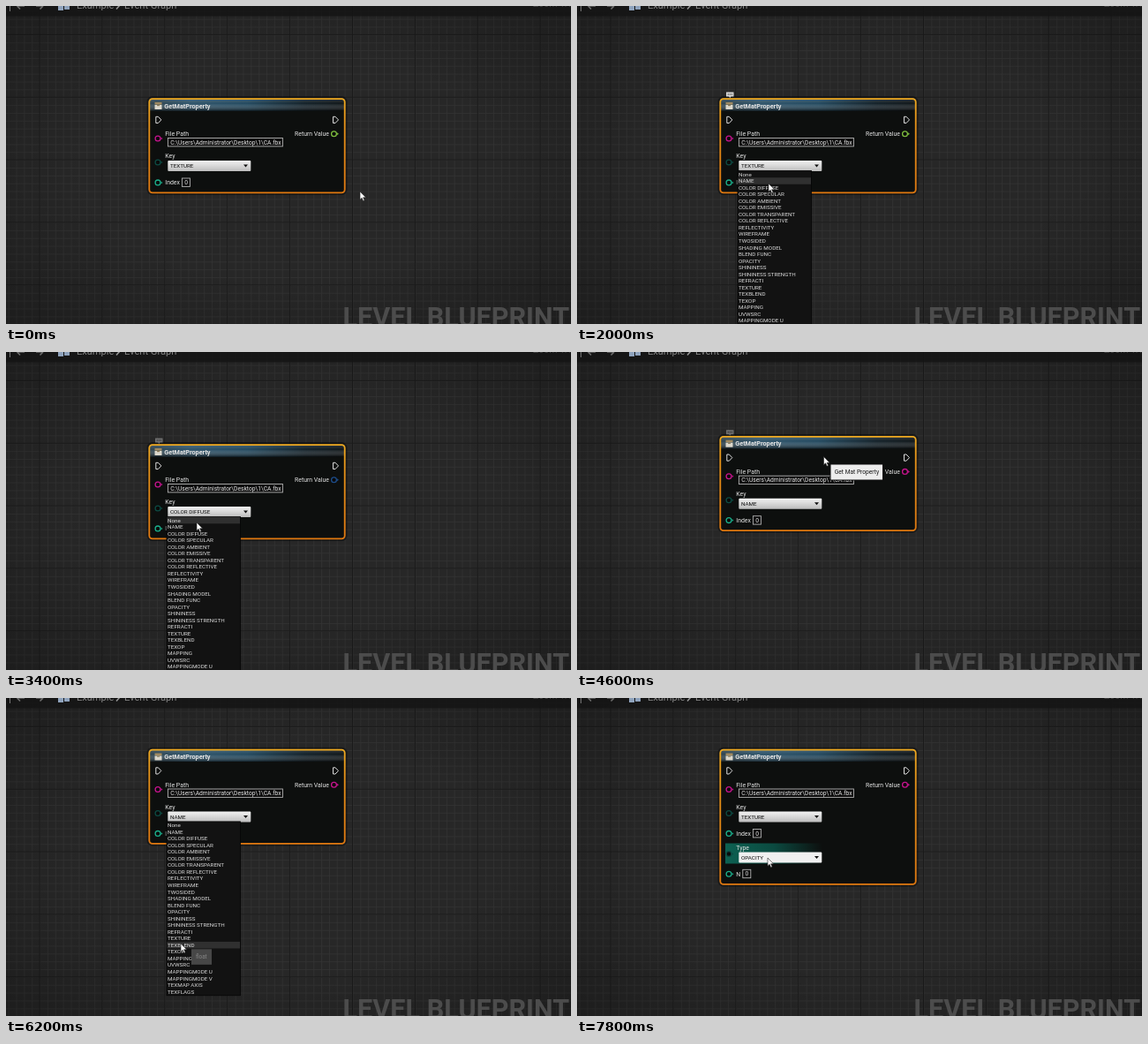
Write an HTML page that moves like this. It is 640 px wide and 360 px high and loops after 8000 ms.

```html
<!DOCTYPE html>
<html lang="en">
<head>
<meta charset="utf-8">
<title>Node graph</title>
<style>
html, body { margin: 0; width: 100%; height: 100%; overflow: hidden; background: #242424; }
svg { display: block; width: 100%; height: 100%; }
text { font-family: Roboto, "Liberation Sans", sans-serif; white-space: pre; }
</style>
</head>
<body>
<svg viewBox="0 0 640 360">
  <defs>
    <pattern id="minor" x="109" y="245" width="8.86" height="8.86" patternUnits="userSpaceOnUse">
      <path d="M0 .4H8.86M.4 0V8.86" stroke="#323232" stroke-width=".8"/>
    </pattern>
    <pattern id="major" x="108.5" y="244.5" width="70.88" height="70.88" patternUnits="userSpaceOnUse">
      <path d="M0 .5H70.88M.5 0V70.88" stroke="#1a1a1a"/>
    </pattern>
    <radialGradient id="shade" cx=".5" cy=".5" r=".72">
      <stop offset=".5" stop-color="#000" stop-opacity="0"/>
      <stop offset="1" stop-color="#000" stop-opacity=".27"/>
    </radialGradient>
    <linearGradient id="frame" x2="0" y2="1">
      <stop stop-color="#efa91f"/><stop offset=".3" stop-color="#e48f16"/><stop offset="1" stop-color="#e0780f"/>
    </linearGradient>
    <linearGradient id="head">
      <stop stop-color="#2f434e"/><stop offset=".2" stop-color="#31566c"/>
      <stop offset=".5" stop-color="#244a60"/><stop offset=".8" stop-color="#14222a"/><stop offset="1" stop-color="#11171a"/>
    </linearGradient>
    <linearGradient id="gloss" x2="0" y2="1">
      <stop stop-color="#fff" stop-opacity=".14"/><stop offset=".4" stop-color="#fff" stop-opacity="0"/>
      <stop offset="1" stop-color="#000" stop-opacity=".55"/>
    </linearGradient>
    <linearGradient id="combo" x2="0" y2="1">
      <stop stop-color="#f2f2f2"/><stop offset="1" stop-color="#bcbcbc"/>
    </linearGradient>
    <linearGradient id="hover">
      <stop stop-color="#0d6152"/><stop offset=".5" stop-color="#0b4a40"/>
      <stop offset="1" stop-color="#0b4a40" stop-opacity="0"/>
    </linearGradient>
  </defs>
  <rect width="640" height="360" fill="#272727"/>
  <rect width="640" height="360" fill="url(#minor)"/>
  <rect width="640" height="360" fill="url(#major)"/>
  <rect width="640" height="360" fill="url(#shade)"/>
  <rect width="640" height="11.5" fill="#151515" opacity=".85"/>
  <path d="M4.5 0V6" stroke="#777"/>
  <path d="M21 0H13.5M16 3.5L12.5 0M34 0H41M38.5 3.5L42 0" stroke="#6c6c6c" stroke-width="1.6" fill="none"/>
  <path d="M59 0h6v5h-6zM66 0h6v4h-6z" fill="#8fa3bd"/>
  <g fill="#858585" font-size="11.1">
    <text x="80" y="3">Example</text>
    <text x="134" y="3">Event Graph</text>
    <text x="597" y="1" fill="#444" font-size="10.5">Zoom 1:1</text>
  </g>
  <path d="M125 3.5L129 -1" stroke="#999" stroke-width="1.5"/>
  <text x="381.5" y="363" font-size="30.6" font-weight="700" fill="#4c4c4c">LEVEL BLUEPRINT</text>
  <g id="scene"></g>
</svg>
<script>
const STEP = 200, LOOP = 8000;
const ROW = 7.54, SNAP = 9.3;
const scene = document.getElementById('scene');

const KEYS = ['None', 'NAME',
  ...['DIFFUSE', 'SPECULAR', 'AMBIENT', 'EMISSIVE', 'TRANSPARENT', 'REFLECTIVE'].map(s => 'COLOR ' + s),
  'REFLECTIVITY', 'WIREFRAME', 'TWOSIDED', 'SHADING MODEL', 'BLEND FUNC', 'OPACITY', 'SHININESS',
  'SHININESS STRENGTH', 'REFRACTI', 'TEXTURE', 'TEXBLEND', 'TEXOP', 'MAPPING', 'UVWSRC',
  'MAPPINGMODE U', 'MAPPINGMODE V', 'TEXMAP AXIS', 'TEXFLAGS'];
const TYPES = ['NONE', 'DIFFUSE', 'SPECULAR', 'AMBIENT', 'EMISSIVE', 'HEIGHT', 'NORMALS',
  'SHININESS', 'OPACITY', 'DISPLACEMENT', 'LIGHTMAP', 'REFLECTION'];

const MOUSE = [
  [401, 210], [398, 209], [352, 197], [285, 188], [232, 185], [217, 184], [217, 184],
  [217, 183], [217, 190], [216, 196], [217, 201], [218, 203], [219, 203], [219, 203],
  [219, 203], [217, 190], [216, 183], [216, 193], [216, 198], [298, 150], [291, 138],
  [282, 130], [279.5, 128], [279.5, 118.5], [279.5, 100], [279.5, 81.5], [262, 100],
  [234, 130], [230, 136], [214, 138], [203, 205], [198, 278], [198, 272], [198, 271],
  [208, 205], [216, 181], [216, 181], [216, 215], [216, 250], [216, 181]
];

// Last value whose start time has passed
const at = (t, steps) => steps.reduce((v, [start, next]) => t >= start ? next : v, null);
const within = (t, from, to) => t >= from && t < to;

const text = (x, y, s, size = 6.9, fill = '#e4e4e4', extra = '') =>
  `<text x="${x}" y="${y}" font-size="${size}" fill="${fill}" ${extra}>${s}</text>`;
const rect = (x, y, w, h, fill, extra = '') =>
  `<rect x="${x}" y="${y}" width="${w}" height="${h}" fill="${fill}" ${extra}/>`;
const path = (d, fill, extra = '') => `<path d="${d}" fill="${fill}" ${extra}/>`;

const pin = (x, y, color) =>
  `<circle cx="${x}" cy="${y}" r="2.9" fill="#0a0a0a" stroke="${color}" stroke-width="1.3"/>` +
  path(`M${x + 3.6} ${y - 1.5}l1.8 1.5l-1.8 1.5z`, color);
const exec = x => path(`M${x} 125.3h2.6l3.4 3.6l-3.4 3.6h-2.6z`, 'none', 'stroke="#ddd" stroke-width="1"');
const field = (x, y, w, s) =>
  rect(x, y, w, 9.4, '#0b0b0b', 'stroke="#b4b4b4" stroke-width=".9"') + text(x + 2.8, y + 7, s, 6.7);

function comboRow(y, label, value, hot) {
  return (hot ? rect(168, y - 5, 110, 23, 'url(#hover)') : '') +
    pin(172, y + 7, '#0d4b43') + text(180.3, y + 2.4, label) +
    rect(183.3, y + 5, 94, 12, hot ? '#f0f0f0' : 'url(#combo)', 'rx="1"') +
    text(186, y + 13, value, 6.25, '#0c0c0c') +
    path(`M269 ${y + 9.6}h5l-2.5 3z`, '#111');
}

function numberRow(y, label, x) {
  return pin(172, y, '#1bb08c') + text(180.3, y + 2.3, label) + field(x, y - 4.9, 9, '0');
}

function menu(y, items, mouseY) {
  const hot = Math.floor((mouseY - y) / ROW);
  const rows = items.map((s, i) =>
    (i === hot ? rect(182.5, y + i * ROW, 82.5, ROW, '#303030') : '') +
    text(183, y + i * ROW + 5.9, s, 6.25, '#dcdcdc'));
  return rect(182, y - .3, 83.5, items.length * ROW + .8, '#121212', 'stroke="#050505" stroke-width=".8"') + rows.join('');
}

function tooltip(x, y, w, s, size) {
  return rect(x, y, w, 18, '#ededed', 'stroke="#111" stroke-width="1"') +
    text(x + 4.8, y + 11.2, s, size, '#161616');
}

function bubble(bright) {
  const c = bright ? '#d5d5d5' : '#6d6d6d';
  return path('M169 97.5h8.5v5h-3l-1.2 1.4l-1.2-1.4h-3.1z', c) +
    path('M170.7 100h1.2M172.7 100h1.2M174.7 100h1.2', 'none', 'stroke="#222" stroke-width="1.1"');
}

function pointer(x, y, move) {
  if (move) {
    const d = 'M-5 0H5M0 -5V5M-3.2 -1.8L-5 0l1.8 1.8M3.2 -1.8L5 0l-1.8 1.8M-1.8 -3.2L0 -5l1.8 1.8M-1.8 3.2L0 5l1.8 -1.8';
    return `<g transform="translate(${x + .5} ${y})">` + path(d, 'none', 'stroke="#111" stroke-width="2.4"') +
      path(d, 'none', 'stroke="#fff" stroke-width="1.1"') + '</g>';
  }
  return path(`M${x} ${y}v9.3l2.1-2l1.5 3.4l1.5-.7l-1.5-3.2h3z`, '#fff', 'stroke="#222" stroke-width=".6"');
}

function node(t, mx, my, dy, open) {
  const tall = t >= 6600;
  const h = tall ? 153 : 107;
  const key = at(t, [[0, 'TEXTURE'], [2400, 'COLOR DIFFUSE'], [3800, 'NAME'], [6600, 'TEXTURE']]);
  const out = at(t, [[0, '#7fbf3f'], [2400, '#1d4e8c'], [4000, '#c8148f']]);
  const over = y => !open && mx > 168 && mx < 278 && my > y + dy - 5 && my < y + dy + 18;
  const header = 'M163 118.5V108q0-3 3-3H380q3 0 3 3v10.5z';
  let s = rect(160.5, 103.3, 225, h + 2.6, 'none', 'rx="5" stroke="#000" stroke-opacity=".4" stroke-width="2"') +
    rect(162.3, 105.1, 221.4, h - .7, '#0d0f0e', 'rx="3.6"') +
    path(header, 'url(#head)') + path(header, 'url(#gloss)') +
    rect(162.3, 105.1, 221.4, h - .7, 'none', 'rx="3.6" stroke="url(#frame)" stroke-width="1.8"') +
    rect(168.5, 109, 8, 2.6, '#a08a62') + rect(168.5, 112, 8, 5, '#dcd8cc') + rect(171, 112, 3, 1.2, '#8d7c58') +
    text(179.3, 115.6, 'GetMatProperty', 7.25, '#e2e2e2', 'font-weight="700"') +
    exec(169.8) + exec(370.5) +
    pin(172, 150, '#c8148f') + text(180.3, 147.1, 'File Path') +
    field(183.4, 149.5, 130, 'C:\\Users\\Administrator\\Desktop\\1\\CA.fbx') +
    text(327, 147.1, 'Return Value') + pin(371.5, 144.7, out) +
    comboRow(170, 'Key', key, over(170)) + numberRow(199.9, 'Index', 199.4);
  if (tall) {
    s += comboRow(216, 'Type', t < 7800 ? 'NONE' : 'OPACITY', over(216)) + numberRow(245.7, 'N', 187.8);
  }
  if (within(t, 400, 5200)) s += bubble(t < 2800);
  return `<g transform="translate(0 ${dy})">${s}</g>`;
}

function draw(t) {
  const [mx, my] = MOUSE[t / STEP];
  const drag = at(t, [[0, 0], [4600, 1], [4800, 3], [5000, 5]]);
  const dy = -drag * SNAP;
  const keyOpen = within(t, 1600, 2400) || within(t, 3200, 3800) || within(t, 5800, 6600);
  const typeOpen = within(t, 7400, 7800);
  let s = node(t, mx, my, dy, keyOpen || typeOpen);
  if (keyOpen) s += menu(186.7 + dy, KEYS, my);
  if (typeOpen) s += menu(232.7 + dy, TYPES, my);
  if (within(t, 1200, 1400) || within(t, 5600, 5800)) {
    s += tooltip(mx + 7.5, my + 6, 100.5, 'Select enum values from the list', 6.35);
  }
  if (within(t, 4400, 5000)) s += tooltip(mx + 7.5, my + 8.5, 59.5, 'Get Mat Property', 6.65);
  if (within(t, 6200, 6400)) {
    s += rect(mx + 12, my + 6.3, 23, 17.5, '#4c4c4c', 'opacity=".92"') + text(mx + 17, my + 17, 'float', 6.3, '#858585');
  }
  scene.innerHTML = s + pointer(mx, my, within(t, 2800, 3000));
}

let shown = -1;
function tick() {
  const t = Math.floor(performance.now() % LOOP / STEP) * STEP;
  if (t !== shown) draw(shown = t);
  requestAnimationFrame(tick);
}
tick();
</script>
</body>
</html>
```
